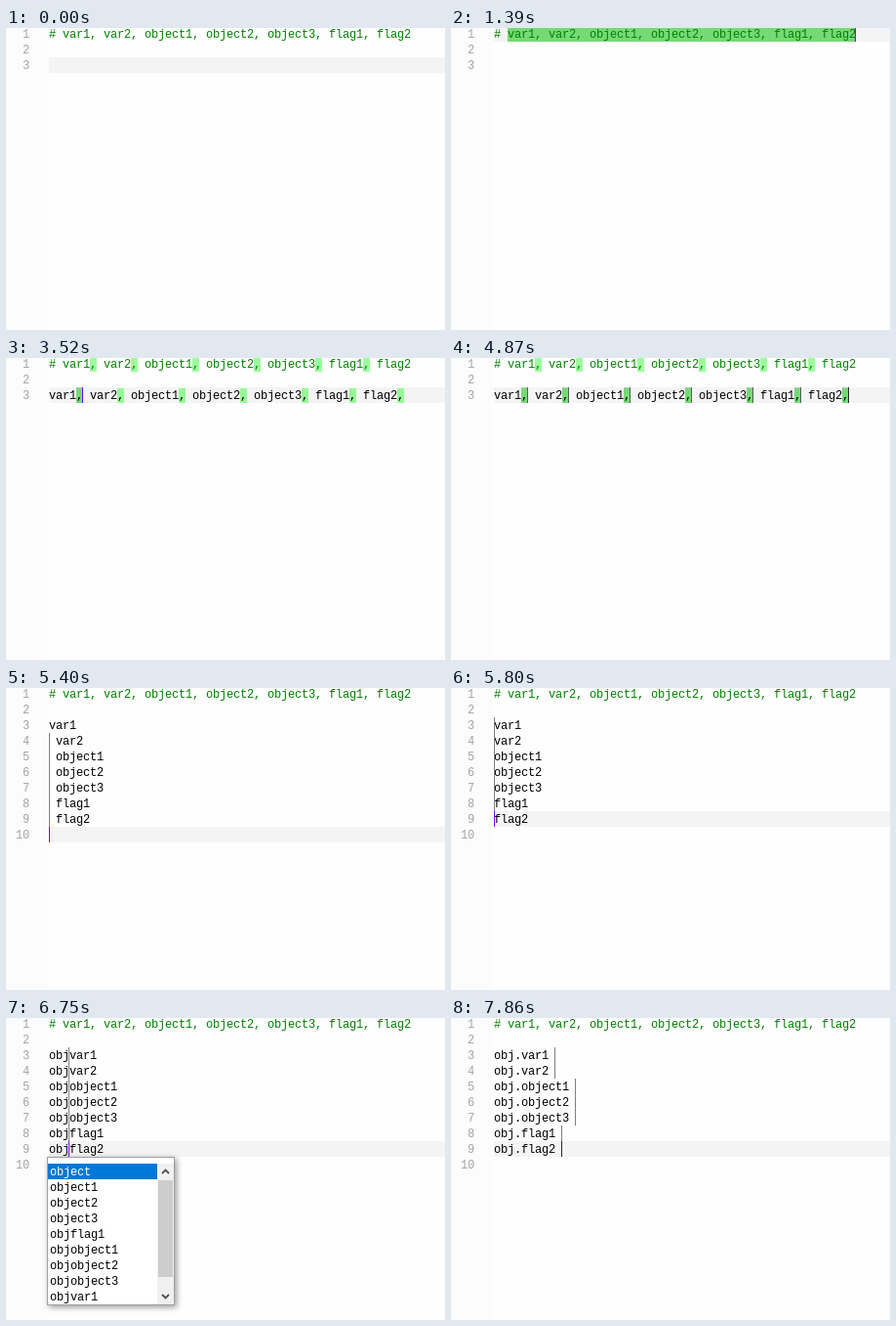
These frames come from a looping animation (450 px wide and 309 px high, 8000 ms). An HTML page with a canvas:

```html
<!DOCTYPE html>
<html lang="en">
<head>
<meta charset="utf-8">
<title>Multi-caret editing</title>
<style>
html, body { margin: 0; width: 100%; height: 100%; overflow: hidden; background: #fefefe; }
canvas { display: block; }
</style>
</head>
<body>
<canvas id="stage" width="450" height="309"></canvas>
<script>
const ctx = document.getElementById('stage').getContext('2d');
const LOOP = 8000, LEFT = 44, CHAR = 7, ROW = 16;
const PURPLE = '#8000ff', DARK = '#262626';
const MATCH = 'rgba(0,255,0,.39)';

const items = ['var1', 'var2', 'object1', 'object2', 'object3', 'flag1', 'flag2'];
const joined = items.join(', ');
const header = '# ' + joined;
const commaCols = text => [...text.matchAll(/,/g)].map(m => m.index);
const commas = commaCols(joined + ',');

const start = [header, '', ''];
const pasted = [header, '', joined];
const closed = [header, '', joined + ','];
const split = (edit = s => s) => [header, '', ...items.map(edit), ''];
const carets = (col, first = 3) =>
  items.map((s, i) => [first + i, typeof col === 'function' ? col(s) : col]);

// time, lines, carets (the last is the main one), extras
const steps = [
  [0, start, [[3, 0]], { hidden: true }],
  [230, start, [[3, 0]]],
  [840, start, [[2, 0]]],
  [960, start, [[1, 0]]],
  [1070, start, [[1, 2]]],
  [1390, start, [[1, header.length]], { selected: header.length - 2 }],
  [1710, start, [[2, 0]]],
  [1880, start, [[3, 0]]],
  [2190, pasted, [[3, joined.length]]],
  [2490, closed, [[3, joined.length + 1]]],
  [2890, closed, [[3, 0]]],
  [3140, closed, [[3, 4]]],
  ...[3520, 3750, 3930, 4110, 4290, 4470, 4870].map((time, i) =>
    [time, closed, commas.slice(0, i + 1).map(c => [3, c + 1]),
      { selected: 1, commas: true, main: i ? DARK : PURPLE }]),
  [5250, split((s, i) => (i ? ' ' : '') + s), carets(0, 4)],
  [5430, split(), carets(0, 4)],
  [5620, split(), carets(s => s.length)],
  [5800, split(), carets(0)],
  ...['o', 'ob', 'obj'].map((prefix, i) =>
    [6350 + i * 200, split(s => prefix + s), carets(i + 1), { prefix }]),
  [7070, split(s => 'obj.' + s), carets(4)],
  [7530, split(s => 'obj.' + s), carets(s => s.length + 4), { main: DARK }],
  [7860, split(s => `obj.${s} `), carets(s => s.length + 5), { main: DARK }]
];

const colX = col => LEFT + col * CHAR;
const rowY = line => line * ROW - 18;

function box(color, x, y, w, h) {
  ctx.fillStyle = color;
  ctx.fillRect(x, y, w, h);
}

// Every glyph sits on a whole-pixel grid
function write(text, x, baseline, color) {
  ctx.fillStyle = color;
  [...text].forEach((ch, i) => ctx.fillText(ch, x + i * CHAR, baseline));
}

function chevron(y, dir) {
  ctx.beginPath();
  ctx.moveTo(160, y + 2 * dir);
  ctx.lineTo(163.5, y - 1.5 * dir);
  ctx.lineTo(167, y + 2 * dir);
  ctx.strokeStyle = '#505050';
  ctx.lineWidth = 1.8;
  ctx.stroke();
}

function drawPopup(prefix) {
  const words = ['object', 'object1', 'object2', 'object3',
    ...items.filter(s => s !== 'flag2').map(s => prefix + s)].sort();
  ctx.save();
  ctx.shadowColor = 'rgba(0,0,0,.4)';
  ctx.shadowBlur = 6;
  ctx.shadowOffsetX = ctx.shadowOffsetY = 2;
  box('#a0a0a0', 42, 142, 131, 152);
  ctx.restore();
  box('#fff', 43, 143, 129, 150);
  box('#0078d7', 43, 149, 112, ROW);
  words.slice(0, 9).forEach((word, i) =>
    write(word, 45, 161 + i * ROW, i ? '#000' : '#fff'));
  box('#f0f0f0', 155, 149, 17, 144);
  box('#cdcdcd', 156, 166, 15, 99);
  chevron(157, 1);
  chevron(285, -1);
}

function draw(time) {
  const [, lines, cursors, extra = {}] = steps.findLast(step => step[0] <= time);
  const { selected = 0, main = PURPLE, hidden, prefix } = extra;
  const current = cursors.at(-1)[0];

  box('#fefefe', 0, 0, 450, 309);
  box('#fcfcfc', 0, 0, 42, 309);
  box('#f4f4f4', LEFT, rowY(current), 406, ROW);

  const mark = (line, col, count) =>
    box(MATCH, colX(col), rowY(line) + 1, count * CHAR, ROW - 1);
  if (selected) {
    for (const [line, col] of cursors)
      box('#c0c0c0', colX(col - selected), rowY(line), selected * CHAR, ROW);
    if (extra.commas)
      lines.forEach((text, i) => commaCols(text).forEach(c => mark(i + 1, c, 1)));
    else
      mark(1, 2, selected);
  }

  ctx.font = '12px "Liberation Mono", monospace';
  lines.forEach((text, i) => {
    const baseline = rowY(i + 1) + 12, number = String(i + 1);
    write(number, 24 - number.length * CHAR, baseline, '#a4a4a4');
    write(text, LEFT, baseline, i ? '#000' : '#008000');
  });

  if (!hidden) cursors.forEach(([line, col], i) => {
    const color = i === cursors.length - 1 ? main : selected ? '#4c664c' : '#7f7f7f';
    box(color, Math.max(LEFT, colX(col) - 1), rowY(line), 1, ROW);
  });
  if (prefix) drawPopup(prefix);
}

const began = performance.now();
function tick() {
  draw((performance.now() - began) % LOOP);
  requestAnimationFrame(tick);
}
tick();
</script>
</body>
</html>
```
